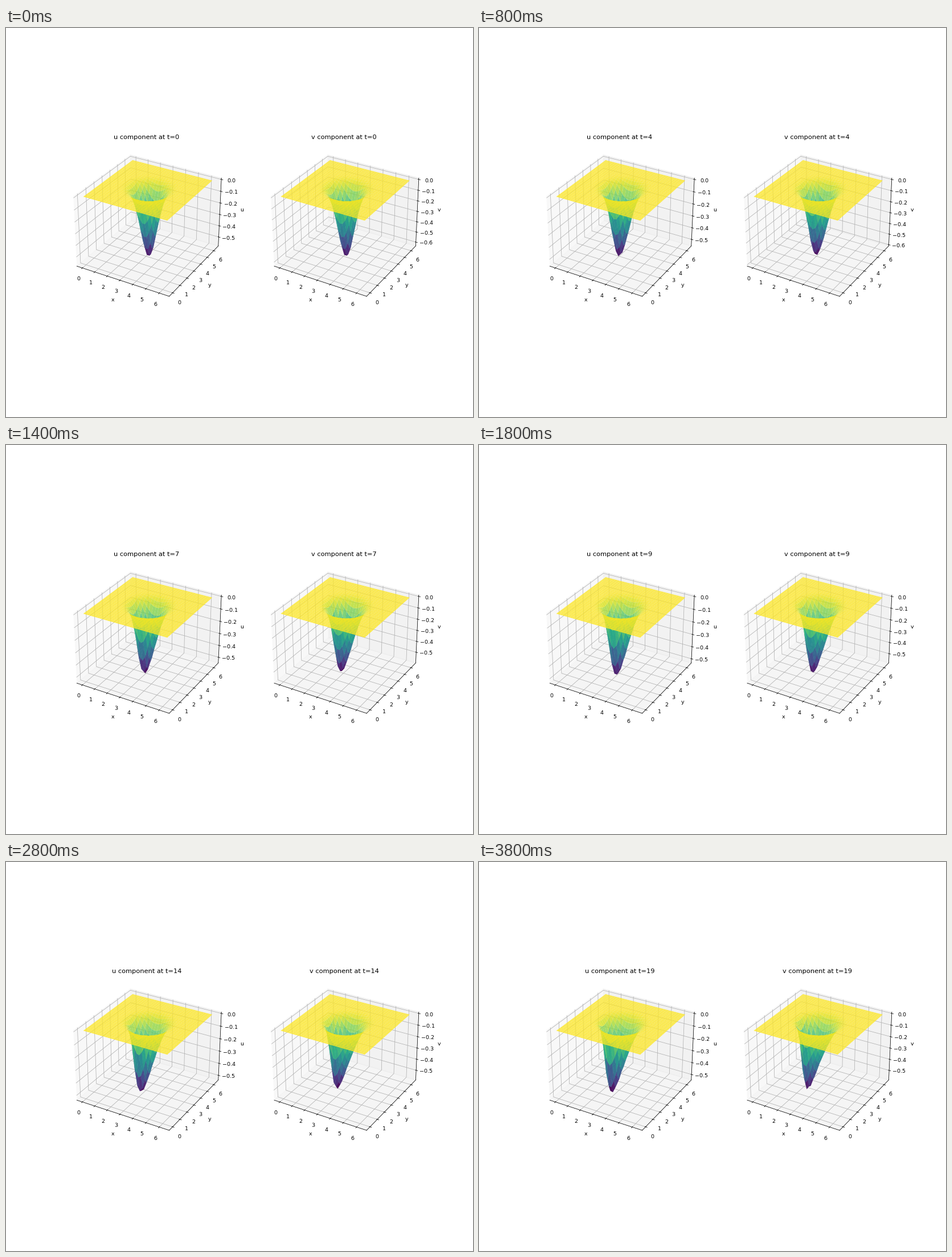
Write a matplotlib script that moves like this. It is 820 by 683 pixels and loops after 4 s.

```python
import numpy as np
import matplotlib.pyplot as plt
from matplotlib.animation import FuncAnimation

W, H = 820, 683
FRAMES, INTERVAL = 20, 200
N, DT = 32, 0.045

axis = np.linspace(0, 2 * np.pi, N)
dx = axis[1] - axis[0]
X, Y = np.meshgrid(axis, axis, indexing="ij")


def forward_diff(f, ax):
    return (np.roll(f, -1, axis=ax) - f) / dx


def step(u, v):
    """One upwind step of the 2D Burgers system in conservative form."""
    uv = u * v
    du = forward_diff(u * u / 2, 0) + forward_diff(uv, 1)
    dv = forward_diff(uv, 0) + forward_diff(v * v / 2, 1)
    return u - DT * du, v - DT * dv


def solve():
    bump = np.exp(-1.6 * ((X - np.pi) ** 2 + (Y - np.pi) ** 2))
    states = [(-0.588 * bump, -0.646 * bump)]
    while len(states) < FRAMES:
        states.append(step(*states[-1]))
    return states


states = solve()

dpi = W / 12
fig = plt.figure(figsize=(12, (H + 0.005) / dpi), dpi=dpi)
axes = [fig.add_subplot(1, 2, k, projection="3d") for k in (1, 2)]


def draw(t):
    for ax, name, z in zip(axes, "uv", states[t]):
        ax.clear()
        ax.plot_surface(X, Y, z, cmap="viridis", alpha=0.8)
        ax.set_title(f"{name} component at t={t}")
        ax.set_xlabel("x")
        ax.set_ylabel("y")
        ax.set_zlabel(name)
    return axes


anim = FuncAnimation(fig, draw, frames=FRAMES, interval=INTERVAL,
                     repeat=True, repeat_delay=0, blit=False)
plt.show()
```
